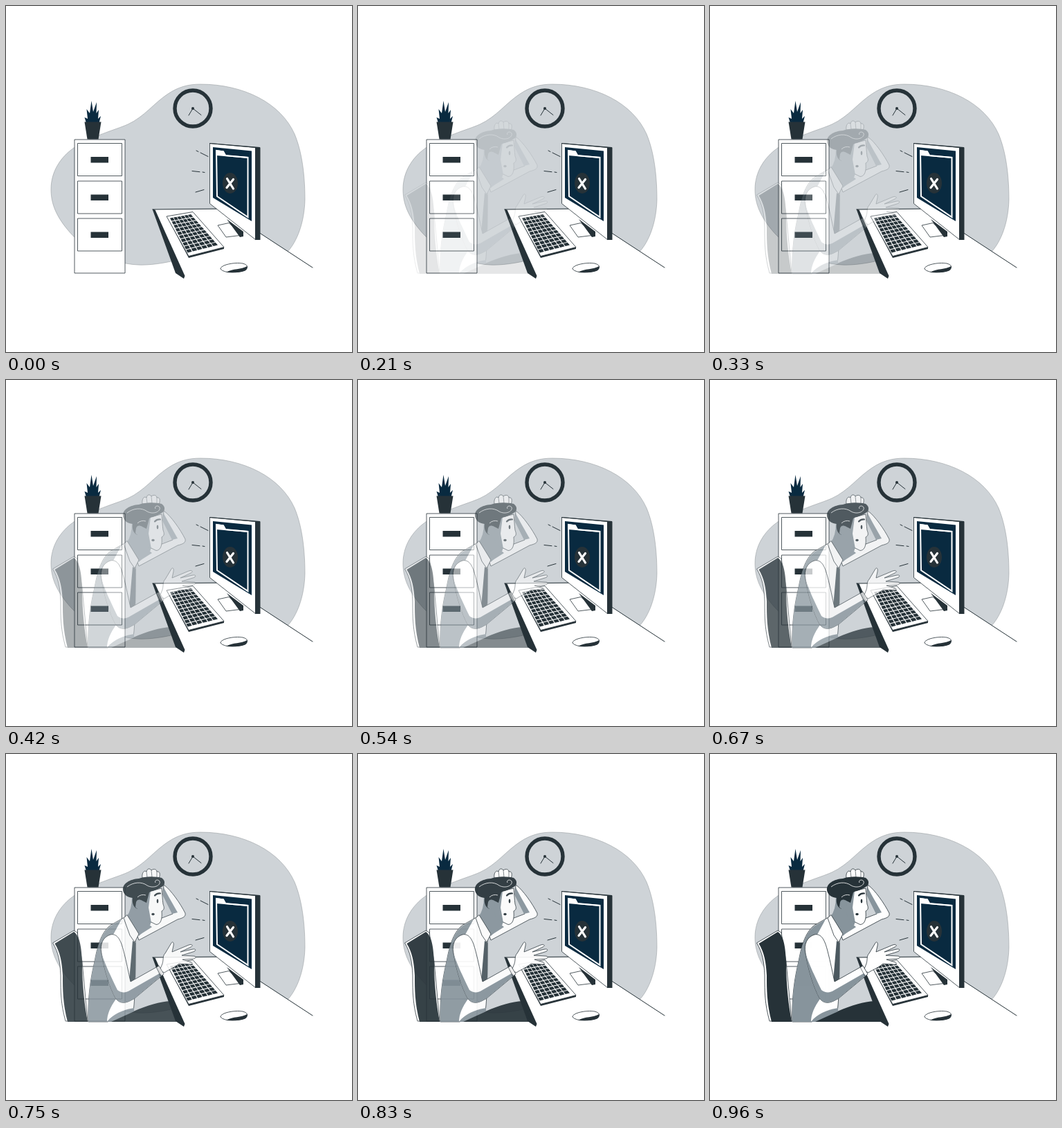
Write an HTML page that moves like this. It is 500 px wide and 500 px high and loops after 1000 ms.

```html
<!DOCTYPE html>
<html lang="en">
<head>
<meta charset="utf-8">
<title>Computer trouble</title>
<style>
  html, body { margin: 0; width: 100%; height: 100%; overflow: hidden; background: #fff; }
  svg { display: block; width: 100%; height: 100%; }
  .d { fill: #263238; }
  .n { fill: #092a40; }
  .w { fill: #fff; }
  .g { fill: #87949c; }
  .o { fill: #fff; stroke: #263238; stroke-width: .8; stroke-linejoin: round; }
  .l { fill: none; stroke: #263238; stroke-width: 1; stroke-linecap: round; stroke-linejoin: round; }
  .thin { stroke-width: .6; }
  .bold { stroke-width: 2.2; }
</style>
</head>
<body>
<svg viewBox="0 0 500 500">
  <path fill="#ced3d7" stroke="#8b9195" stroke-width=".5" d="M281 113C343 113 397 140 417 185C430 216 432 255 432 280C431 315 420 340 408 354L250 366C230 372 205 375 190 374C150 372 110 350 88 322C70 300 65 282 65 265C65 240 78 219 98 205C123 188 158 179 176 171C200 160 214 140 234 127C249 117 263 113 281 113Z"/>

  <!-- clock -->
  <circle cx="270" cy="148" r="26" fill="none" stroke="#263238" stroke-width="5.4"/>
  <path class="l" d="M264 158L270 148L282 157.500"/>
  <circle class="d" cx="270" cy="148" r="2"/>

  <!-- plant -->
  <path class="n" d="M116 169L113.500 161L118 163L116.500 149L121 155L123.500 137L126 153L131 139L130.500 155L134 150L133 163L137 159L134.500 169Z"/>
  <path class="d" d="M113.500 167.500H137.500L133.500 192.500H117.500Z"/>

  <!-- cabinet -->
  <path class="o" d="M99 193H172V386H99Z"/>
  <g id="drawers"></g>

  <!-- desk -->
  <path class="w" d="M212 294H313L368 329L443 378V400H258Z"/>
  <path class="l" d="M212 294L313 293L443 378"/>
  <path class="d" d="M211.500 293.500L215.500 294.500L258.500 390L257 394L245 386Z"/>

  <path class="l" d="M275 209L278 210.500M281 212L292 217.500M269 238.500L280 239.700M284 240L287 240.500M274 269L286 265.500"/>

  <!-- monitor -->
  <path class="o" d="M306 317L322 313.500L342 331L318 334Z"/>
  <path class="d" d="M319 308L343 326V333L338 334Z"/>
  <path class="o" d="M294.500 198.500L361 204.500V338L294.500 285.500Z"/>
  <path class="d" d="M360 204L367.500 204.500V338H360ZM294 198L367 204V205.500L294 199Z"/>
  <path class="n" d="M299 204L355 209.500V311L299 277Z"/>
  <path fill="none" stroke="#fff" stroke-width="2" d="M304 209L314 210.500L317 216L349.500 219V305L305 275Z"/>
  <path class="w" d="M303 208L314.500 209.500L318 215.500L350 218V220L304 216Z"/>
  <ellipse class="d" cx="324" cy="256" rx="11" ry="15"/>
  <path stroke="#fff" stroke-width="3.200" stroke-linecap="round" d="M319.500 249.500L328.500 264M328.500 250.500L319 262.500"/>

  <!-- keyboard and mouse -->
  <path class="d" d="M232 304L264 361L315 348V351L264 364Z"/>
  <path class="o" d="M232 304L270 297.500L315 348.500L264 361.500Z"/>
  <path id="keys" class="d"/>
  <path class="o" d="M310 380C310 374 330 370 342 372C350 374 350 378 346 381C338 386 315 387 310 380Z"/>
  <path class="d" d="M318 385C328 379 340 381 348.500 376C350 382 344 384 335 385Z"/>

  <g id="man" opacity="0">
    <!-- chair -->
    <path class="o" d="M67.500 273L98 255L103 258L110 300L118 386H86C79 360 79 345 79 320C78 300 76 287 67.500 273Z"/>
    <path class="d" d="M70.500 274L98 257C107 263 109 280 110 300C110 330 113 360 118 387H89C82 360 82 340 82 320C81 300 78 286 70.500 274Z"/>

    <!-- raised arm -->
    <path class="o" d="M186 252L241 231L227 203L228 189C238 196 252 216 259 230C260 235 256 237 248 239L192 269Z"/>
    <path class="g" d="M228 193C233 203 242 218 248 229L240 231L227 205ZM188 253L205 245L211 250L192 262Z"/>

    <!-- trousers and torso -->
    <path class="d" d="M147 387L184 372C205 363 222 358 238 357L250 387Z"/>
    <path class="o" d="M171 236L150 248C137 259 132 278 128 300C122 325 118 352 119 387H147L184 372C187 350 187 310 187 270Z"/>
    <path class="g" d="M167 239L150 249C137 260 132 279 128 300C122 325 118 352 119 387H146C146 376 151 365 159 354L148 310L150 270Z"/>
    <path class="g" d="M146 387C154 376 168 370 185 367V372L152 387Z"/>
    <path fill="#4b585f" d="M183 270L187.500 273L187 322L182 337L178 328Z"/>

    <!-- head -->
    <path class="g" d="M182 206L206 200L209 246L192 263L174 235Q182 226 182 206Z"/>
    <path class="o" d="M170 237L175 232.500L192 260L186 272L179 262Z"/>
    <path class="o" d="M197 179C196 173 199 167 203 170C204 165 208 165 210 168C214 165 218 167 218 170C223 169 223 175 221 180Z"/>
    <path class="l thin" d="M203 170L204 178M210 168L211 178M218 170V178"/>
    <path class="o" d="M204 199L225 194C226 203 226 210 227 217C229 222 229 225 225 227C226 238 224 246 217 246.500L206 241C203 230 202 210 204 199Z"/>
    <path class="g" d="M190 206L209 198L206 222L210 244L200 238Z"/>
    <path class="d" d="M169 197C168 187 179 181 192 180C202 176 218 177 225 179C231 183 230 190 225 192C218 197 210 198 207 200L203 215L195 211L190 224C183 221 182 213 183 208C175 207 170 203 169 197Z"/>
    <path class="g" d="M188 214C190 208 198 210 198 217C197 226 190 226 187 221Z"/>
    <path fill="none" stroke="#fff" stroke-width=".8" d="M175 192C184 185 196 184 204 190C213 195 224 190 222 184C219 180 214 183 216 186M190 207Q195 202 202 204"/>
    <path class="l bold" d="M215 204.500Q218 201 223 201.500"/>
    <ellipse class="d" cx="219" cy="212.500" rx="1.300" ry="3"/>
    <ellipse class="d" cx="212.500" cy="231.500" rx="2.200" ry="1.800"/>

    <!-- lower arm and hand -->
    <path class="o" d="M226 303C228 296 226 292 230 288L239 273C241 270 243 273 242 277L240 286L264 276C269 274 271 277 267 279L252 286L270 282C275 281 275 285 270 286L254 291L272 292C276 293 274 296 270 296L255 297L268 301C271 303 268 305 264 304L250 303C242 310 234 312 229 316L222 313Z"/>
    <path class="o" d="M151 261C141 264 135 274 138 288C142 312 150 338 159 354C167 363 176 359 186 353L228 318L221 306L180 329C177 316 174 300 170 285C166 269 161 259 151 261Z"/>
    <path class="g" d="M138 288C142 312 150 338 159 354C167 363 176 359 186 353L225 320L222 317L180 341C173 346 166 345 161 341C152 322 143 304 138 288Z"/>
    <path class="l thin" d="M217 308L224 321"/>
  </g>
</svg>
<script>
  const $ = id => document.getElementById(id);

  $('drawers').innerHTML = [198.5, 253, 307].map(y =>
    `<path class="o" d="M103.500 ${y}h64v47h-64z"/><path class="d" d="M122.500 ${y + 19.5}h25.500v8.500h-25.500z"/>`
  ).join('');

  // Keys fill a skewed quadrilateral; u runs across, v runs down.
  const mix = (a, b, k) => a + (b - a) * k;
  const point = (u, v) => [
    mix(mix(237, 268, u), mix(263, 308, u), v),
    mix(mix(306.5, 301, u), mix(357.5, 346, u), v)
  ].map(n => n.toFixed(1)).join(' ');
  const cols = 6, rows = 10;
  let keys = '';
  for (let r = 0; r < rows; r++) {
    for (let c = 0; c < cols; c++) {
      const u = c / cols, v = r / rows, U = (c + .84) / cols, V = (r + .8) / rows;
      keys += `M${point(u, v)}L${point(U, v)}L${point(U, V)}L${point(u, V)}Z`;
    }
  }
  $('keys').setAttribute('d', keys);

  // The man fades in with a smooth ease, sampled at uneven steps.
  const steps = [0, 210, 330, 420, 460, 500, 540, 580, 630, 670, 750, 830, 960];
  function draw(now) {
    const t = now % 1000;
    const p = steps.filter(s => s <= t).pop() / 1000;
    $('man').setAttribute('opacity', p * p * (3 - 2 * p));
    requestAnimationFrame(draw);
  }
  draw(performance.now());
</script>
</body>
</html>
```
